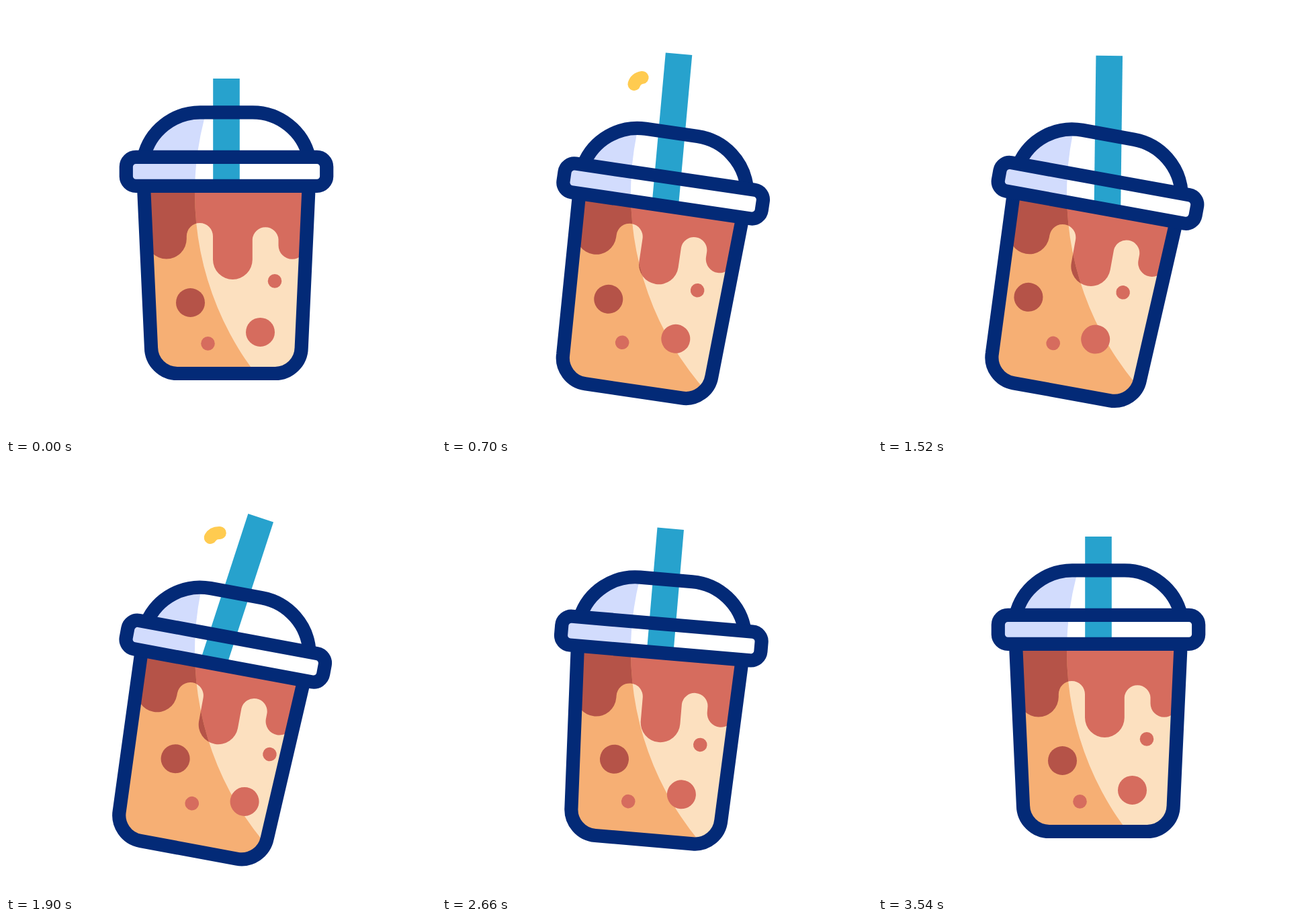
Recreate the animation shown at these times as an HTML page. Size 640 px wide and 640 px high, loop 3600 ms.

```html
<!DOCTYPE html>
<html lang="en">
<head>
<meta charset="utf-8">
<title>Iced drink</title>
<style>
  html, body { margin: 0; width: 100%; height: 100%; overflow: hidden; background: #fff; }
  svg { display: block; width: 100vw; height: 100vh; }
</style>
</head>
<body>
<svg viewBox="0 0 640 640">
  <defs>
    <path id="body" d="M205 268L216 508.500A39 39 0 0 0 255 547H400.600A39 39 0 0 0 439.700 508.500L450.700 268"/>
    <path id="dome" d="M205 225A86.500 86.500 0 0 1 289 158.300H367A86.500 86.500 0 0 1 451 225"/>
    <rect id="rim" x="178.800" y="224.800" width="298.400" height="43" rx="14.500"/>
    <path id="syrup" d="M150 150H500V356.300H446.500A20.500 20.500 0 0 1 405.500 356.300V347.300A19.400 19.400 0 0 0 366.800 347.300V377.500A29.400 29.400 0 0 1 308 377.500V342.700A19.600 19.600 0 0 0 268.800 342.700V346.500A30 30 0 0 1 208.800 346.500H150Z"/>
    <clipPath id="inBody"><use href="#body"/></clipPath>
    <clipPath id="inShade"><path d="M-100 -164H724A443 443 0 0 0 724 722H-100Z"/></clipPath>
  </defs>

  <g clip-path="url(#inShade)">
    <g class="cup" fill="#d2dcfd"><use href="#dome"/><use href="#rim"/></g>
  </g>

  <g class="cup">
    <g id="straw">
      <rect x="-19.800" y="0" width="39.600" height="300" fill="#27a2cd"/>
      <path id="mark" d="M-51 40Q-60.500 42.500 -62.300 51" pathLength="1" fill="none"
            stroke="#ffcb50" stroke-width="19" stroke-linecap="round"/>
    </g>
    <g clip-path="url(#inBody)">
      <use href="#body" fill="#fce0bf"/>
      <use class="syrup" href="#syrup" fill="#d66c5e"/>
    </g>
  </g>

  <g clip-path="url(#inShade)">
    <g class="cup">
      <g clip-path="url(#inBody)">
        <use href="#body" fill="#f6af74"/>
        <use class="syrup" href="#syrup" fill="#b55348"/>
      </g>
    </g>
  </g>

  <g class="cup">
    <g id="bubbles" clip-path="url(#inBody)"></g>
    <g fill="none" stroke="#032a77" stroke-width="20.200">
      <use href="#body"/><use href="#dome"/><use href="#rim"/>
    </g>
  </g>
</svg>

<script>
const LOOP = 3600;
const STIR_START = 630, STIR_PERIOD = 680;
const TAU = 2 * Math.PI;

const all = sel => [...document.querySelectorAll(sel)];
const byId = id => document.getElementById(id);
const clamp = v => Math.max(0, Math.min(1, v));
const ramp = (t, a, b) => clamp((t - a) / (b - a));
const ease = (t, a, b) => { const p = ramp(t, a, b); return p * p * (3 - 2 * p); };

// Up to a height, hold, drop past rest by `over`, settle.
const hop = (t, high, over) =>
  high * ease(t, 120, 620) - (high + over) * ease(t, 2420, 2920) + over * ease(t, 2920, 3480);

// A wave that fades in at its start and dies out before the cup swings back.
const fade = (t, start) => ease(t, start, start + 140) * (1 - ease(t, 2100, 2340));
const wave = (t, start, period) => -fade(t, start) * Math.sin(TAU * (t - start) / period);

// Each bubble follows the stirring with its own start and period.
const bubbles = [
  { x: 274.5, y: 441.5, r: 21.5, fill: "#b55348", start: 650, period: 645 },
  { x: 378.5, y: 485.4, r: 21.5, fill: "#d66c5e", start: 728, period: 720 },
  { x: 300.5, y: 502.4, r: 10.3, fill: "#d66c5e", start: 951, period: 578 },
  { x: 400, y: 409.4, r: 10.3, fill: "#d66c5e", start: 851, period: 635 }
];

for (const b of bubbles) {
  b.el = document.createElementNS("http://www.w3.org/2000/svg", "circle");
  b.el.setAttribute("r", b.r);
  b.el.setAttribute("fill", b.fill);
  byId("bubbles").append(b.el);
}

const cups = all(".cup"), syrups = all(".syrup");
const straw = byId("straw"), mark = byId("mark");

function cupPose(t) {
  const creep = 1 - (1 - ramp(t, 600, 1900)) ** 2;
  const windUp = ease(t, 1900, 2480);
  const stay = 1 - ease(t, 2480, 2800);
  const x = -stay * (13.3 * ease(t, 160, 640) + 7.4 * creep + 6 * windUp);
  const y = stay * (27.6 * ease(t, 120, 620) + 3 * creep + 2 * windUp)
    - ease(t, 2600, 2800) + ease(t, 2900, 3500);
  const tilt = 8 * ease(t, 120, 600) + 2.5 * creep
    - 15.5 * ease(t, 2400, 3040) + 5 * ease(t, 3040, 3540);
  return `translate(${x} ${y}) rotate(${tilt} 328 353)`;
}

// The mark shows while the straw swings left.
function markLength(t) {
  const speed = Math.cos(TAU * (t - STIR_START) / STIR_PERIOD);
  return clamp(Math.min(2.2 * speed - 0.4, 4 * fade(t, STIR_START)));
}

function draw(t) {
  const pose = cupPose(t);
  cups.forEach(el => el.setAttribute("transform", pose));

  const slosh = hop(t, -22, -11.2);
  syrups.forEach(el => el.setAttribute("transform", `translate(0 ${slosh})`));

  const swing = 10.3 * wave(t, STIR_START, STIR_PERIOD);
  const top = -50 - hop(t, 67.4, 21);
  straw.setAttribute("transform", `translate(328 158) rotate(${swing}) translate(0 ${top})`);

  const len = markLength(t);
  mark.style.display = len > 0 ? "" : "none";
  mark.setAttribute("stroke-dasharray", `${len} 2`);

  const sway = 12 * Math.sin(TAU * ramp(t, 2150, 3150));
  const lift = hop(t, -24.3, -5.5);
  for (const b of bubbles) {
    b.el.setAttribute("cx", b.x + sway + 25 * wave(t, b.start, b.period));
    b.el.setAttribute("cy", b.y + lift);
  }
}

const began = performance.now();
function tick() {
  draw((performance.now() - began) % LOOP);
  requestAnimationFrame(tick);
}
draw(0);
requestAnimationFrame(tick);
</script>
</body>
</html>
```
